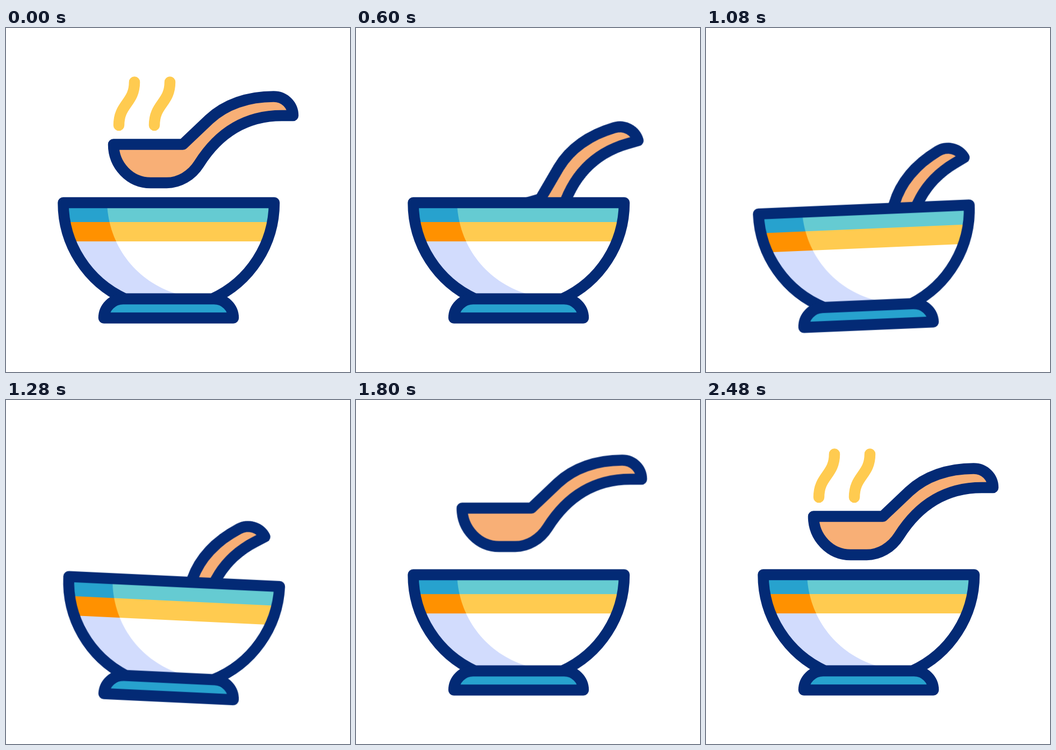
These frames come from a looping animation (640 px wide and 640 px high, 2600 ms). An HTML page:

```html
<!DOCTYPE html>
<html lang="en">
<head>
<meta charset="utf-8">
<title>Bowl and spoon</title>
<style>
  html, body { margin: 0; width: 100%; height: 100%; overflow: hidden; background: #fff; }
  svg { display: block; width: 100%; height: 100%; }

  .line { stroke: #032a75; stroke-width: 20.5; stroke-linejoin: round; stroke-linecap: round; }

  .slide, .dip, .tilt, .sink, .rock, .steam {
    animation: 2600ms cubic-bezier(.37, 0, .63, 1) infinite;
  }
  .slide { animation-name: slide; }
  .dip   { animation-name: dip; }
  .tilt  { animation-name: tilt; transform-origin: 269px 250px; }
  .sink  { animation-name: sink; }
  .rock  { animation-name: rock; transform-origin: 302.5px 539.5px; }
  .steam {
    animation-name: steam;
    fill: none; stroke: #ffcb50; stroke-width: 20.5; stroke-linecap: round;
    stroke-dasharray: 1 3; stroke-dashoffset: 0;
  }
  .late { animation-delay: 100ms; }

  @keyframes slide {
    0%, 12.31%       { transform: translateX(0); }
    26.15%, 43.85%   { transform: translateX(29px); }
    59.23%           { transform: translateX(-10px); }
    69.62%           { transform: translateX(-2.6px); }
    92.31%, 100%     { transform: translateX(0); }
  }
  @keyframes dip {
    0%, 14.23%       { transform: translateY(0); }
    30.38%, 43.85%   { transform: translateY(202px); }
    59.23%           { transform: translateY(211px); }
    69.62%           { transform: translateY(-16px); }
    92.31%, 100%     { transform: translateY(0); }
  }
  @keyframes tilt {
    0%, 15%          { transform: rotate(0deg); }
    30.77%, 43.85%   { transform: rotate(-31deg); }
    59.23%           { transform: rotate(-18.8deg); }
    69.62%, 100%     { transform: rotate(0deg); }
  }
  @keyframes sink {
    0%, 23.08%       { transform: translateY(0); }
    35.38%, 50.77%   { transform: translateY(12.5px); }
    70.38%, 100%     { transform: translateY(0); }
  }
  @keyframes rock {
    0%, 23.08%       { transform: rotate(0deg); }
    35.38%           { transform: rotate(-5.3deg); }
    50.77%           { transform: rotate(2.9deg); }
    68.46%, 100%     { transform: rotate(0deg); }
  }
  /* The dash leaves at the top, then the next one grows from the bottom. */
  @keyframes steam {
    0%               { stroke-dashoffset: 0; }
    12.31%           { stroke-dashoffset: -1.02; }
    72%              { stroke-dashoffset: -2.98; }
    84.31%, 100%     { stroke-dashoffset: -4; }
  }
</style>
</head>
<body>
<svg viewBox="0 0 640 640">
  <defs>
    <path id="cup" d="M106.5 325H499A196.5 196.5 0 0 1 383.5 504H221.5A196.5 196.5 0 0 1 106.5 325Z"/>
    <clipPath id="inside"><use href="#cup"/></clipPath>
    <clipPath id="shade"><path d="M90 325H188.5V335C195 410 245 472 316 494L340 505H90Z"/></clipPath>
  </defs>

  <g class="slide"><g class="dip"><g class="tilt">
    <path class="steam late" pathLength="1" d="M210 181C210 161 217 151 224.5 140.5S239 120 239 100.5"/>
    <path class="steam" pathLength="1" d="M276 181C276 161 283 151 290.5 140.5S305 120 305 100.5"/>
    <path class="line" fill="#f8af76" d="M200 216.5H329L378 170C408 142 450 127.5 498 127.5C518 127.5 534 143 534 163H513C450 163 398 191 359 253C345 275 322 288 299 288H269C231 288 200 256 200 216.5Z"/>
  </g></g></g>

  <g class="sink"><g class="rock">
    <g clip-path="url(#inside)">
      <path fill="#fff" d="M90 320H520V510H90Z"/>
      <path fill="#65cbd2" d="M90 320H520V361H90Z"/>
      <path fill="#ffcb50" d="M90 361H520V397H90Z"/>
      <g clip-path="url(#shade)">
        <path fill="#27a2ce" d="M90 320H360V361H90Z"/>
        <path fill="#ff9100" d="M90 361H360V397H90Z"/>
        <path fill="#d2dcfd" d="M90 397H360V510H90Z"/>
      </g>
    </g>
    <use href="#cup" class="line" fill="none"/>
    <path class="line" fill="#27a2ce" d="M182 539.5H423C423 520 407 504 387 504H218C198 504 182 520 182 539.5Z"/>
  </g></g>
</svg>
</body>
</html>
```
